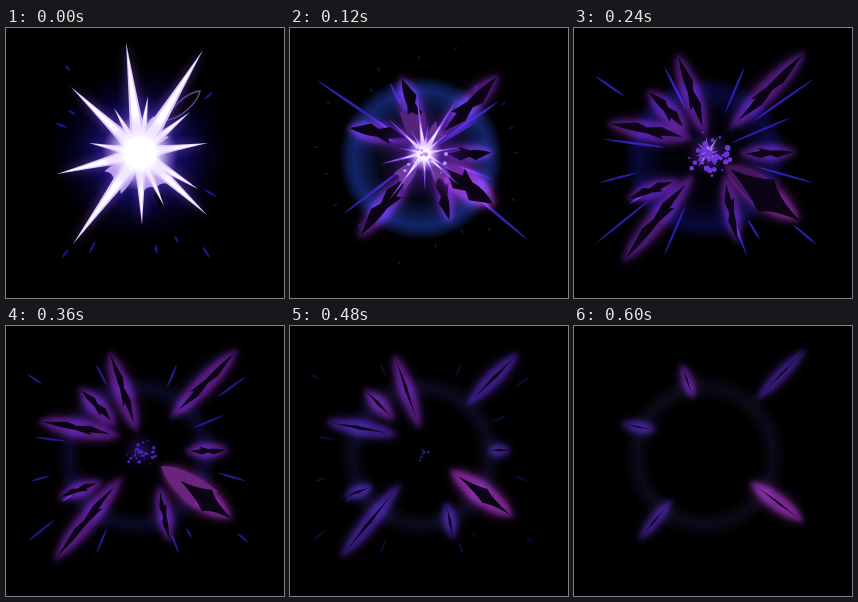
An HTML page with a canvas that plays this animation: 278x270 px, repeating every 0.72 s.

```html
<!DOCTYPE html>
<html>
<head>
<meta charset="utf-8">
<title>Shard burst</title>
<style>
html, body { margin: 0; height: 100%; overflow: hidden; background: #000 }
canvas { display: block; width: 100vw; height: 100vh }
</style>
</head>
<body>
<canvas id="stage" width="278" height="270"></canvas>
<script>
const ctx = document.getElementById('stage').getContext('2d');
const CX = 134, CY = 125, STEP = 120, COUNT = 6;

// Unit outlines: x runs from root to tip, y across
const LENS = new Path2D('M0 0Q.18 -.5 .5 -.5Q.82 -.5 1 0Q.82 .5 .5 .5Q.18 .5 0 0Z');
const SPIKE = new Path2D('M0 -.5Q.3 -.3 1 0Q.3 .3 0 .5Z');
const CORE = new Path2D('M0 0L.3 -.2 .26 -.5 .5 -.22Q.75 -.3 1 0L.64 .5 .5 .25 .3 .5Z');
const ARROW = new Path2D('M0 0Q.3 -.16 .48 -.5Q.62 -.16 1 0Q.64 .2 .55 .5Q.35 .2 0 0Z');
const PETAL = new Path2D('M0 0Q.2 -.5 .7 -.46Q.55 -.2 .62 0Q.48 .2 .6 .46Q.2 .4 0 0Z');

// Root, tip, late start along the line, then the last remaining stretch
const SHARDS = [
  [145,112, 232,23, .36, .42,1],
  [133,112, 103,25, .1, .45,.85],
  [125,112, 32,95, .18, .45,.84],
  [118,108, 73,62, .3],
  [125,140, 48,235, .18, .35,.78],
  [115,148, 52,172, .5],
  [148,135, 164,216, .5],
  [148,135, 226,193, .15, .35,1.05],
  [150,126, 223,124, .65]
];
const BIG = 7;

// Outer ends of the thin rays, longest first
const RAYS = [
  [241,50], [21,216], [218,89], [28,111], [240,155], [90,228], [171,38],
  [90,38], [173,228], [25,155], [21,48], [243,217], [55,176], [186,212]
];
const FIRST_RAYS = [
  [25,51], [239,213], [52,187], [209,73], [190,91], [62,97], [202,151], [100,55]
];
const SPARKS = [
  [59,37], [49,95], [62,82], [204,230], [151,226],
  [83,226], [56,230], [211,169], [207,64], [172,215]
];

const STAR = [
  [120,14], [197,22], [65,59], [202,115], [51,146], [67,216], [201,187],
  [136,197], [192,161], [83,115], [142,68], [108,80], [184,84], [158,178]
];

const rgba = (c, a = 1) => `rgba(${c},${a})`;

function random(seed) {
  return () => {
    seed = (seed * 16807) % 2147483647;
    return seed / 2147483647;
  };
}

function put(path, x1, y1, x2, y2, w, fill, blur = 0) {
  ctx.save();
  ctx.translate(x1, y1);
  ctx.rotate(Math.atan2(y2 - y1, x2 - x1));
  ctx.scale(Math.hypot(x2 - x1, y2 - y1), w);
  if (blur) ctx.filter = `blur(${blur}px)`;
  ctx.fillStyle = fill;
  ctx.fill(path);
  ctx.restore();
}

function ray([x, y], len, w, fill) {
  const k = len / Math.hypot(x - CX, y - CY);
  put(LENS, x + (CX - x) * k, y + (CY - y) * k, x, y, w, fill);
}

function halo(x, y, r, stops) {
  const g = ctx.createRadialGradient(x, y, 0, x, y, r);
  stops.forEach(([at, c, a]) => g.addColorStop(at, rgba(c, a)));
  ctx.fillStyle = g;
  ctx.fillRect(x - r, y - r, 2 * r, 2 * r);
}

function star(scale, width, fill, blur) {
  for (const [x, y] of STAR) {
    const dx = x - CX, dy = y - CY, w = 7 + Math.hypot(dx, dy) * .11;
    put(SPIKE, CX, CY, CX + dx * scale, CY + dy * scale, w * width, fill, blur);
  }
}

function flash() {
  halo(CX, CY, 90, [[0, '60,40,200', .9], [.5, '22,16,125', .65], [1, '0,0,40', 0]]);
  SPARKS.forEach((s, i) => ray(s, 8 + i * 5 % 9, 2.4, '#1c1696'));
  put(CORE, 130, 100, 118, 22, 13, '#08040f');
  put(LENS, 160, 93, 195, 62, 13, '#5d4a86');
  put(LENS, 162, 91, 193, 64, 10, '#07040d');
  star(1.02, 1.5, 'rgba(112,72,190,.55)', 5);
  put(PETAL, 134, 130, 160, 178, 34, '#b79be6');
  put(PETAL, 130, 130, 94, 168, 30, '#b79be6');
  put(PETAL, 136, 118, 166, 88, 28, '#c5aaf0');
  put(CORE, 151, 160, 157, 187, 10, '#0a0514');
  star(1, 1, '#dcc6ff');
  star(.9, .65, '#fff');
  halo(CX, CY, 38, [[0, '255,255,255', 1], [.4, '255,255,255', 1], [1, '190,150,255', 0]]);
}

function ring(n) {
  const c = ['', '18,36,104', '7,9,56', '9,9,36', '10,10,28', '11,10,23'][n];
  const early = n < 3;
  halo(131, 130, 82, [
    [0, c, 0], [early ? .52 : .66, c, early ? .2 : 0], [.82, c, 1], [.9, c, .7], [1, c, 0]
  ]);
}

function rays(n) {
  if (n > 1) {
    const shrink = [0, 0, 1, .5, .28, 0][n], alpha = [0, 0, .95, .75, .32, 0][n];
    RAYS.forEach((p, i) => ray(p, (76 - 4 * i) * shrink, 2.4, rgba('48,28,175', alpha)));
    return;
  }
  FIRST_RAYS.forEach((p, i) => ray(p, 108 - 12 * i, 2.8, '#3420ad'));
  const rnd = random(71);
  for (let i = 0; i < 18; i++) {
    const a = i * .35 + rnd() * .2, r = 82 + rnd() * 38;
    ray([CX + r * Math.cos(a), CY + r * Math.sin(a)], 5, 2, '#141050');
  }
}

// Visible stretch of a shard at a step
function stretch(late, lastFrom = 0, lastTo = 0, n) {
  if (n === 5) return [lastFrom, lastTo];
  return [late * [0, 0, .3, .6, 1][n], [0, .74, 1, 1, .97][n]];
}

function shards(n) {
  const power = n === 2 ? .8 : .88;
  const fat = [0, 1.05, 1, .95, .8, .6][n];
  const coreFat = [0, .7, .5, .36, .13, .05][n];
  SHARDS.forEach(([x1, y1, x2, y2, late, from, to], i) => {
    const [a, b] = stretch(late, from, to, n), big = i === BIG;
    if (a === b || (n === 1 && (i === 3 || i === 5))) return;
    const at = t => [x1 + (x2 - x1) * t, y1 + (y2 - y1) * t];
    const line = [...at(a), ...at(b)], w = big ? 32 : late > .4 ? 19 : 23;
    const c = big ? '122,38,146' : n > 3 && i !== 1 && i !== 3 ? '58,30,130' : '86,28,130';
    ctx.globalCompositeOperation = 'lighter';
    put(LENS, ...line, w * fat * 1.15, rgba(c, power * .55), 5);
    put(LENS, ...line, w * fat * .85, rgba(c, power * .6), 2);
    ctx.globalCompositeOperation = 'source-over';
    if (big && (n === 2 || n === 3)) {
      put(PETAL, ...line, 30, n === 2 ? '#43145d' : '#6b247e');
      put(ARROW, ...at(a + (n === 2 ? .06 : .25)), ...at(b), n === 2 ? 36 : 23, '#0c0315');
    } else {
      const thick = w * (big && n === 4 ? .42 : coreFat) + .6;
      put(n > 3 ? ARROW : CORE, ...at(a + (b - a) * .13), ...at(a + (b - a) * .95), thick, '#0c0316');
    }
  });
}

function specks(n) {
  const count = [0, 16, 44, 32, 13, 0][n], reach = [0, 27, 23, 16, 14, 0][n];
  const size = [0, 1.5, 2.1, 1.3, .9, 0][n], wide = n === 4 ? .4 : 1;
  const rnd = random(29);
  ctx.fillStyle = ['', '#b990ff', '#6f35db', '#4a25b7', '#35208c', ''][n];
  for (let i = 0; i < count; i++) {
    const a = rnd() * 7, r = reach * rnd();
    ctx.beginPath();
    ctx.arc(CX + r * wide * Math.cos(a), CY + 1 + r * Math.sin(a), size * (.4 + rnd()), 0, 7);
    ctx.fill();
  }
}

function heart(n) {
  if (n === 1) {
    halo(CX, CY, 48, [[0, '150,80,255', .9], [.4, '95,40,190', .55], [1, '50,15,100', 0]]);
    put(PETAL, 132, 120, 116, 62, 26, '#54247a');
    put(PETAL, 136, 118, 160, 90, 19, '#643093');
    put(PETAL, 128, 132, 98, 166, 20, '#6b3b9b');
    put(PETAL, 141, 132, 160, 163, 19, '#65358f');
    star(.52, .3, '#8a4df5');
    star(.28, .35, '#efe2ff');
    halo(CX, CY + 1, 18, [[0, '255,255,255', 1], [.3, '255,245,255', 1], [1, '170,95,255', 0]]);
  } else if (n === 2) {
    halo(CX, CY, 24, [[0, '130,70,235', .65], [1, '60,20,130', 0]]);
    star(.15, .2, '#a477f5');
  } else if (n === 3) {
    halo(CX, CY, 20, [[0, '60,30,150', .6], [1, '35,15,90', 0]]);
  }
  specks(n);
}

function draw(n) {
  ctx.fillStyle = '#000';
  ctx.fillRect(0, 0, 278, 270);
  ctx.fillStyle = '#0c0006';
  ctx.fillRect(0, 268, 278, 2);
  if (n === 0) return flash();
  ring(n);
  rays(n);
  shards(n);
  heart(n);
}

const start = performance.now();
let shown = -1;

function tick() {
  const n = Math.floor((performance.now() - start) / STEP) % COUNT;
  if (n !== shown) draw(shown = n);
  requestAnimationFrame(tick);
}
tick();
</script>
</body>
</html>
```
